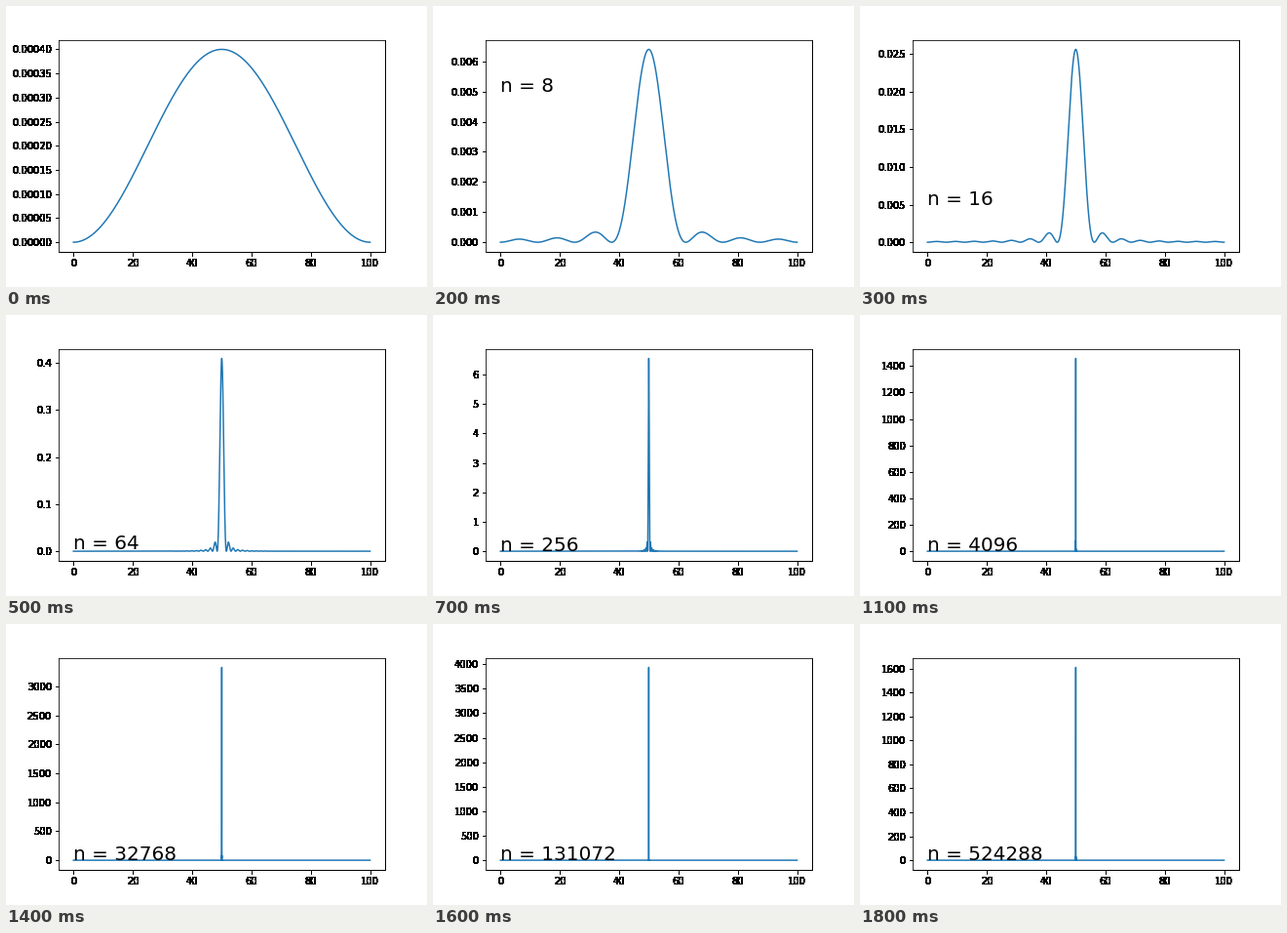
A matplotlib script for the animation above (1900 ms loop, 432 by 288 pixels).

```python
import numpy as np
import matplotlib.pyplot as plt
from matplotlib.animation import FuncAnimation

FRAMES = 19
INTERVAL = 100

plt.rcParams["font.family"] = "DejaVu Sans"
fig, ax = plt.subplots(figsize=(6, 4), dpi=72, facecolor="white")
fig.subplots_adjust(left=0.125, right=0.9, bottom=0.125, top=0.88)

# An even number of samples straddles the central peak.
x = np.linspace(0, 100, 10000)
phase = np.pi * (x - 50) / 100


def harden(image, dpi):
    """Turn every touched pixel solid black, without antialiasing."""
    solid = np.zeros_like(image)
    solid[..., 3] = image[..., 3] > 0
    return solid, 0, 0


def intensity(n):
    """Interference pattern of n slits."""
    return 1e-4 * (np.sin(n * phase) / np.sin(phase)) ** 2


def draw(frame):
    n = 2 ** (frame + 1)
    ax.clear()
    ax.plot(x, intensity(n), color="#1f77b4", lw=1.5)
    ax.text(0, 0.005, f"n = {n}", fontsize=20)
    for part in (ax.xaxis, ax.yaxis, ax.spines["right"], ax.spines["bottom"]):
        part.set_agg_filter(harden)


anim = FuncAnimation(fig, draw, frames=FRAMES, interval=INTERVAL,
                     init_func=lambda: draw(0), repeat=True, repeat_delay=0)
plt.show()
```
